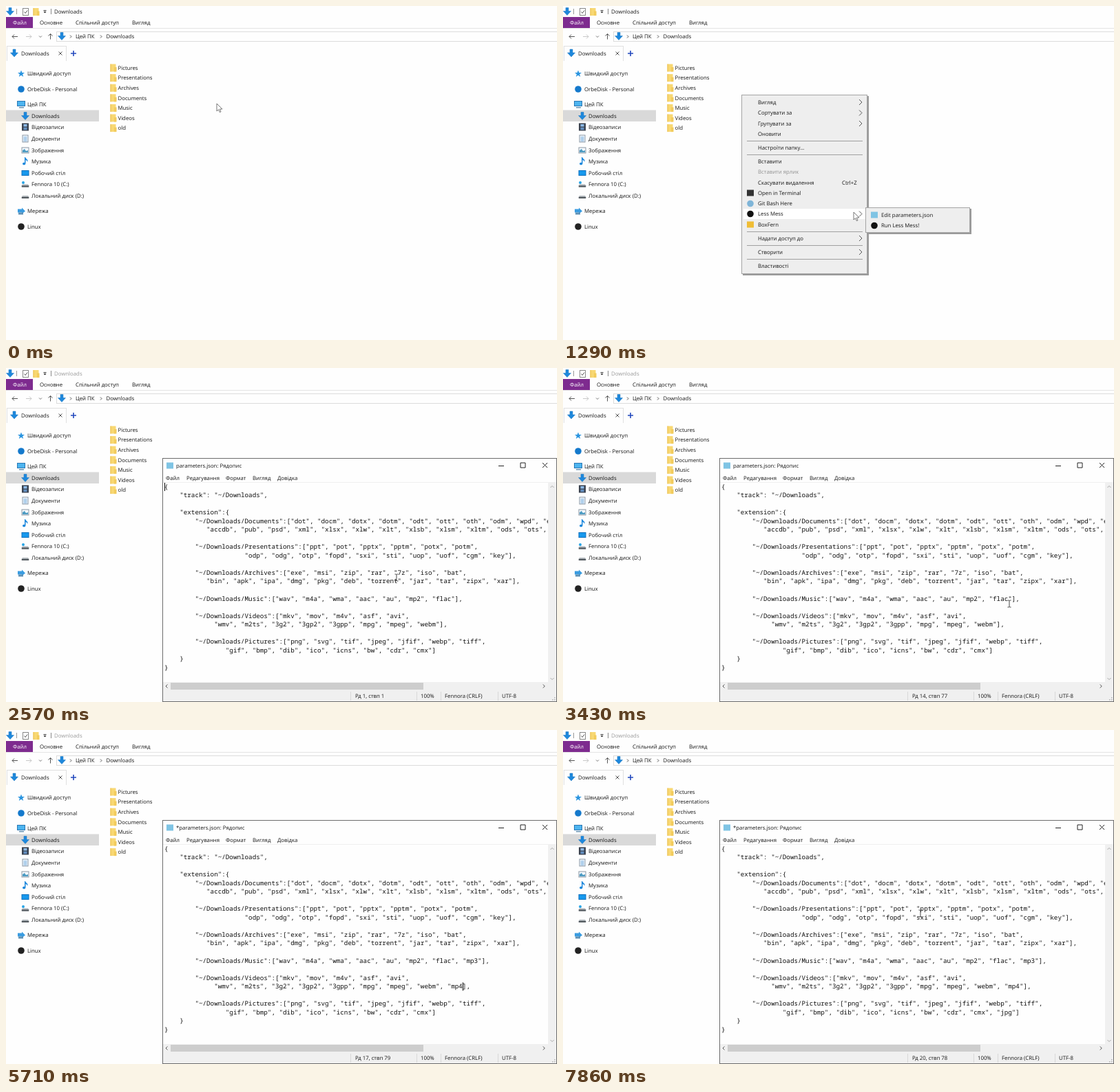
These frames come from a looping animation (800 by 486 pixels, 8 s). An HTML page with a canvas:

```html
<!DOCTYPE html>
<html lang="uk">
<head>
<meta charset="utf-8">
<title>Downloads</title>
<style>
html, body { margin: 0; width: 100%; height: 100%; overflow: hidden; background: #fefefe; }
canvas { display: block; }
</style>
</head>
<body>
<canvas id="stage" width="800" height="486"></canvas>
<script>
const ctx = document.getElementById('stage').getContext('2d');
const LOOP = 8000, STEP = 1000 / 7;
const UI = '7.8px "Open Sans", "Noto Sans", sans-serif';
const MONO = '9.25px "Noto Sans Mono", "DejaVu Sans Mono", monospace';
const CHAR = 5.55, LINE = 12.52, CODE_X = 230, CODE_Y = 173;
const BLUE = '#1e88dc', INK = '#151515';
const clamp = (v, lo, hi) => Math.max(lo, Math.min(hi, v));

function rect(x, y, w, h, fill, border) {
  if (border) { ctx.fillStyle = border; ctx.fillRect(x, y, w, h); x++; y++; w -= 2; h -= 2; }
  ctx.fillStyle = fill;
  ctx.fillRect(x, y, w, h);
}
function text(s, x, y, color = INK, font = UI) {
  ctx.font = font;
  ctx.fillStyle = color;
  ctx.fillText(s, x, y + 2.75);
}
function shape(d, x, y, fill, stroke, width = 1) {
  const path = new Path2D(d);
  ctx.save();
  ctx.translate(x, y);
  if (fill) { ctx.fillStyle = fill; ctx.fill(path); }
  if (stroke) { ctx.strokeStyle = stroke; ctx.lineWidth = width; ctx.stroke(path); }
  ctx.restore();
}
function dot(x, y, r, fill) {
  ctx.fillStyle = fill;
  ctx.beginPath();
  ctx.arc(x, y, r, 0, 7);
  ctx.fill();
}
const line = (d, x, y, color = '#555', width = 1) => shape(d, x, y, null, color, width);
const chevron = (x, y, s = 2, color = '#555') => line(`M${-s / 2} ${-s}L${s / 2} 0L${-s / 2} ${s}`, x, y, color);

// Icons, centred on x, y
const downArrow = (x, y) => shape('M-2 -5.5H2V-.5H5.5L0 5.5L-5.5 -.5H-2Z', x, y, BLUE, '#1672bd', .5);
function folder(x, y) {
  rect(x - 4.5, y - 5.5, 8, 11, '#f8d873');
  rect(x + 1, y - 1, 3.5, 6.5, '#f2cb5c');
  rect(x - 4.5, y - 5.5, 1, 11, '#e9bd4e');
}
const star = (x, y) => shape('M0 -5L1.4 -1.6L5 -1.5L2.1 .8L3.2 4.5L0 2.3L-3.2 4.5L-2.1 .8L-5 -1.5L-1.4 -1.6Z', x, y, '#2b95e0');
function computer(x, y) {
  rect(x - 6, y - 5, 12, 8, '#4db4ef', '#2b78b4');
  rect(x - 3, y + 4, 7, 1.5, '#6793b3');
}
function film(x, y) {
  rect(x - 5, y - 5.5, 10, 11, '#3b4350');
  rect(x - 2.5, y - 4, 5, 3.5, '#8ebbe8');
  rect(x - 2.5, y + .7, 5, 3.5, '#6490c2');
}
function page(x, y) {
  rect(x - 4.5, y - 5.5, 9, 11, '#f7fbff', '#8796a5');
  for (const dy of [-2.5, 0, 2.5]) rect(x - 2.5, y + dy, 5, 1, '#4c94d1');
}
function picture(x, y) {
  rect(x - 5.5, y - 4.5, 11, 9, '#f5faff', '#8b98a4');
  shape('M-4 3V0L-1 -2L1 1L4 0V3Z', x, y, '#4e9cc3');
}
const note = (x, y) => shape('M-1 -6H0C1 -3 5 -3 3 1C3 -1 1 -2 .5 -2V3C.5 6 -4 6 -4 3.5C-4 2 -2 1.5 -1 2Z', x, y, BLUE);
const desktop = (x, y) => rect(x - 5.5, y - 4, 11, 8, '#1798ed', '#1171bd');
function drive(x, y) {
  shape('M-4 0H4L5.5 2V4H-5.5V2Z', x, y, '#aab0b5');
  rect(x - 5, y + 2, 10, 2, '#50575c');
}
function systemDrive(x, y) { drive(x, y); dot(x - 3, y - 2.5, 2, '#28a5e6'); }
function network(x, y) {
  shape('M-5 -3H1V-5L6 0L1 4V2H-5Z', x, y, '#3a9ce0');
  rect(x - 4, y + 2, 7, 3, '#5f91b5');
}
const disc = color => (x, y) => dot(x, y, 4.8, color);
const square = color => (x, y) => rect(x - 5, y - 4.5, 10, 9, color);

const sidebar = [
  [0, 98.5, 'Швидкий доступ', star],
  [0, 121, 'OrbeDisk - Personal', disc('#1479cc')],
  [0, 143, 'Цей ПК', computer],
  [1, 160, 'Downloads', downArrow],
  [1, 176, 'Відеозаписи', film],
  [1, 193, 'Документи', page],
  [1, 210, 'Зображення', picture],
  [1, 226, 'Музика', note],
  [1, 243, 'Робочий стіл', desktop],
  [1, 259.5, 'Fennora 10 (C:)', systemDrive],
  [1, 276, 'Локальний диск (D:)', drive],
  [0, 298.5, 'Мережа', network],
  [0, 321, 'Linux', disc('#222')],
];
const folders = ['Pictures', 'Presentations', 'Archives', 'Documents', 'Music', 'Videos', 'old'];

function explorer(focused) {
  rect(0, 0, 800, 486, '#fefefe');
  downArrow(6, 8);
  rect(15, 4, 1, 8, '#999');
  rect(24, 3, 9, 11, '#fff', '#888');
  line('M-2 0L-.5 2L2.5 -2', 28.5, 8.5);
  folder(44, 8.5);
  shape('M-2 0H2L0 2.5Z', 56.5, 8, '#333');
  rect(54.5, 6, 4, 1, '#333');
  rect(65, 4, 1, 8, '#888');
  text('Downloads', 70, 8, focused ? INK : '#999');

  rect(0, 16, 39, 16, '#7e2b8f');
  text('Файл', 10, 24, '#fff');
  text('Основне', 49, 24);
  text('Спільний доступ', 101, 24);
  text('Вигляд', 183, 24);
  rect(0, 32, 800, 1, '#e4e4e4');

  line('M4 0H-4M-1 -3L-4 0L-1 3', 13, 44.5);
  line('M-4 0H4M1 -3L4 0L1 3', 33, 44.5, '#c8c8c8');
  line('M-2 -1L0 1L2 -1', 50, 44.5, '#777');
  line('M0 4V-4M-3 -1L0 -4L3 -1', 64.5, 44.5);
  rect(73, 37, 730, 15, '#fefefe', '#dcdcdc');
  downArrow(81, 44);
  chevron(94, 44.5);
  text('Цей ПК', 101, 44.5);
  chevron(138, 44.5);
  text('Downloads', 145.5, 44.5);

  rect(1, 58, 87, 22, '#fefefe', '#e0e0e0');
  rect(2, 79, 85, 1, '#fefefe');
  downArrow(12, 68.5);
  text('Downloads', 22, 69);
  line('M-2.5 -2.5L2.5 2.5M2.5 -2.5L-2.5 2.5', 79, 69);
  line('M-4 0H4M0 -4V4', 98, 69, '#2349bd', 1.6);

  rect(0, 151.5, 135, 16.5, '#d9d9d9');
  for (const [child, y, label, icon] of sidebar) {
    icon(child ? 28 : 22, y);
    text(label, child ? 37 : 31, y);
  }
  folders.forEach((name, i) => {
    folder(156, 90 + i * 14.6);
    text(name, 162.5, 90 + i * 14.6);
  });
}

const notepadIcon = square('#7fc4e4'), appIcon = disc('#111');
const menuItems = [
  [140, 'Вигляд', '>'], [155.5, 'Сортувати за', '>'], [171, 'Групувати за', '>'], [186, 'Оновити'],
  [206.5, 'Настроїти папку...'], [226.5, 'Вставити'], [241.5, 'Вставити ярлик', 'off'],
  [257, 'Скасувати видалення'], [272, 'Open in Terminal', '', square('#333')],
  [287.5, 'Git Bash Here', '', disc('#7fb5d8')], [302.5, 'Less Mess', '>', appIcon],
  [318, 'BoxFern', '', square('#f0bd35')],
  [338, 'Надати доступ до', '>'], [358, 'Створити', '>'], [378.5, 'Властивості'],
];

function panel(x, y, w, h) {
  rect(x + 2, y + 2, w, h, '#9a9a9a');
  rect(x, y, w, h, '#eeeeee', '#a5a5a5');
}
function contextMenu(step, pointer) {
  const opened = step >= 9;
  panel(259, 129, 183, 261);
  for (const y of [196, 216, 328, 348, 368]) rect(267, y, 168, 1, '#a0a0a0');
  for (const [y, label, kind, icon] of menuItems) {
    const hot = opened ? label === 'Less Mess' : pointer.x > 261 && Math.abs(pointer.y - y) < 7.5;
    if (hot) rect(262, y - 7.5, 177, 15, '#fff');
    if (icon) icon(272, y);
    text(label, 283, y, kind === 'off' ? '#919191' : INK);
    if (kind === '>') chevron(432, y, 4);
  }
  text('Ctrl+Z', 405, 257);
  if (!opened) return;
  panel(439, 293, 152, 37);
  if (pointer.x > 441) rect(442, 296, 146, 15, '#fff');
  notepadIcon(452, 304);
  text('Edit parameters.json', 462, 304);
  appIcon(452, 319.5);
  text('Run Less Mess!', 462, 319.5);
}

const list = words => words.split(' ').map(w => `"${w}"`).join(', ');
const typed = (word, step, start) => `, "${word}"`.slice(0, clamp(step - start, 0, 7));
const group = (name, words) => `        "~/Downloads/${name}":[${list(words)}`;
const more = (indent, words) => ' '.repeat(indent) + list(words);

const codeLines = step => [
  '{',
  '    "track": "~/Downloads",',
  '',
  '    "extension":{',
  group('Documents', 'dot docm dotx dotm odt ott oth odm wpd eps') + ',',
  more(11, 'accdb pub psd xml xlsx xlw xlt xlsb xlsm xltm ods ots') + ',',
  '',
  group('Presentations', 'ppt pot pptx pptm potx potm') + ',',
  more(21, 'odp odg otp fopd sxi sti uop uof cgm key') + '],',
  '',
  group('Archives', 'exe msi zip rar 7z iso bat') + ',',
  more(11, 'bin apk ipa dmg pkg deb torrent jar tar zipx xar') + '],',
  '',
  group('Music', 'wav m4a wma aac au mp2 flac') + typed('mp3', step, 24) + '],',
  '',
  group('Videos', 'mkv mov m4v asf avi') + ',',
  more(13, 'wmv m2ts 3g2 3gp2 3gpp mpg mpeg webm') + typed('mp4', step, 34) + '],',
  '',
  group('Pictures', 'png svg tif jpeg jfif webp tiff') + ',',
  more(16, 'gif bmp dib ico icns bw cdr cmx') + typed('jpg', step, 44) + ']',
  '    }',
  '}',
];

// Caret row and column, and the step of the last caret action
function caretAt(step) {
  const at = (row, column, start) => {
    const n = clamp(step - start, 0, 7);
    return { row, column: column + n, since: start + n };
  };
  if (step < 20) return { row: 1, column: 1, since: 17 };
  if (step < 25) return { row: 14, column: 77, since: 20 };
  if (step < 33) return at(14, 77, 24);
  if (step < 34) return { row: 17, column: 72, since: 33 };
  return step < 44 ? at(17, 73, 34) : at(20, 71, 44);
}

function editor(step) {
  const caret = caretAt(step);
  rect(227, 131, 573, 355, '#fefefe', '#6c6c6c');
  notepadIcon(238, 142);
  text((step >= 25 ? '*' : '') + 'parameters.json: Рядопис', 247, 142);
  line('M-4 0H4', 719, 142.5, '#222');
  line('M-3.5 -3.5H3.5V3.5H-3.5Z', 750.5, 141.5, '#222');
  line('M-3.5 -3.5L3.5 3.5M3.5 -3.5L-3.5 3.5', 782.5, 141.5, '#222');
  [['Файл', 232], ['Редагування', 262], ['Формат', 319], ['Вигляд', 358], ['Довідка', 394]]
    .forEach(([label, x]) => text(label, x, 160));
  rect(228, 166, 571, 1, '#f0f0f0');

  ctx.save();
  ctx.beginPath();
  ctx.rect(228, 166, 559, 291);
  ctx.clip();
  codeLines(step).forEach((s, i) => text(s, CODE_X, CODE_Y + i * LINE, '#111', MONO));
  if ((step - caret.since) % 8 < 4)
    rect(Math.round(CODE_X + (caret.column - 1) * CHAR), CODE_Y - 6 + (caret.row - 1) * LINE, 1, 12, '#000');
  ctx.restore();

  rect(787, 167, 12, 303, '#f0f0f0');
  rect(228, 457, 571, 13, '#f0f0f0');
  rect(239, 458, 367, 10, '#cdcdcd');
  line('M-2.5 1L0 -1.5L2.5 1', 793, 173, '#aaa');
  line('M-2.5 -1L0 1.5L2.5 -1', 793, 452, '#aaa');
  line('M1 -2.5L-1.5 0L1 2.5', 233.5, 463);
  chevron(781, 463, 2.5);
  rect(228, 470, 571, 15, '#f0f0f0');
  for (const x of [500, 596, 631, 714]) rect(x, 471, 1, 13, '#d8d8d8');
  text(`Рд ${caret.row}, ствп ${caret.column}`, 507, 477.5);
  text('100%', 602, 477.5);
  text('Fennora (CRLF)', 637, 477.5);
  text('UTF-8', 720, 477.5);
  for (const [x, y] of [[796, 482], [793, 482], [796, 479]]) rect(x, y, 1.5, 1.5, '#b5b5b5');
}

// Pointer way points: step, x, y
const route = [
  [0, 306, 142], [3, 259, 129], [5, 262, 133], [8, 342, 245], [9, 422, 300], [12, 482, 302], [16, 482, 302],
  [18, 567, 305], [20, 648, 343], [31, 648, 343], [33, 628, 374], [42, 628, 374], [44, 626, 411],
  [52, 626, 411], [55, 519, 267],
];
function pointerAt(step) {
  const i = Math.max(1, route.findIndex(p => p[0] >= step));
  const [s0, x0, y0] = route[i - 1], [s1, x1, y1] = route[i];
  const k = (step - s0) / (s1 - s0);
  return { x: x0 + (x1 - x0) * k, y: y0 + (y1 - y0) * k };
}
const typing = step => [[25, 31], [34, 41], [45, 51]].some(([a, b]) => step >= a && step <= b);

function draw(now) {
  const step = Math.floor((now % LOOP + 5) / STEP) % 56;
  const pointer = pointerAt(step), editing = step >= 17;
  ctx.textRendering = 'geometricPrecision';
  explorer(!editing);
  if (editing) editor(step);
  else if (step >= 4) contextMenu(step, pointer);

  if (!editing)
    shape('M0 0V11L2.6 8.7L4.3 12.6L6 11.9L4.4 8H8Z', pointer.x, pointer.y, '#fff', '#555', .8);
  else if (!typing(step))
    line('M-2.5 -5H-.5L0 -4.5L.5 -5H2.5M0 -4.5V4.5M-2.5 5H-.5L0 4.5L.5 5H2.5', pointer.x, pointer.y, '#333', .9);
}

const start = performance.now();
function tick() {
  draw(performance.now() - start);
  requestAnimationFrame(tick);
}
tick();
</script>
</body>
</html>
```
